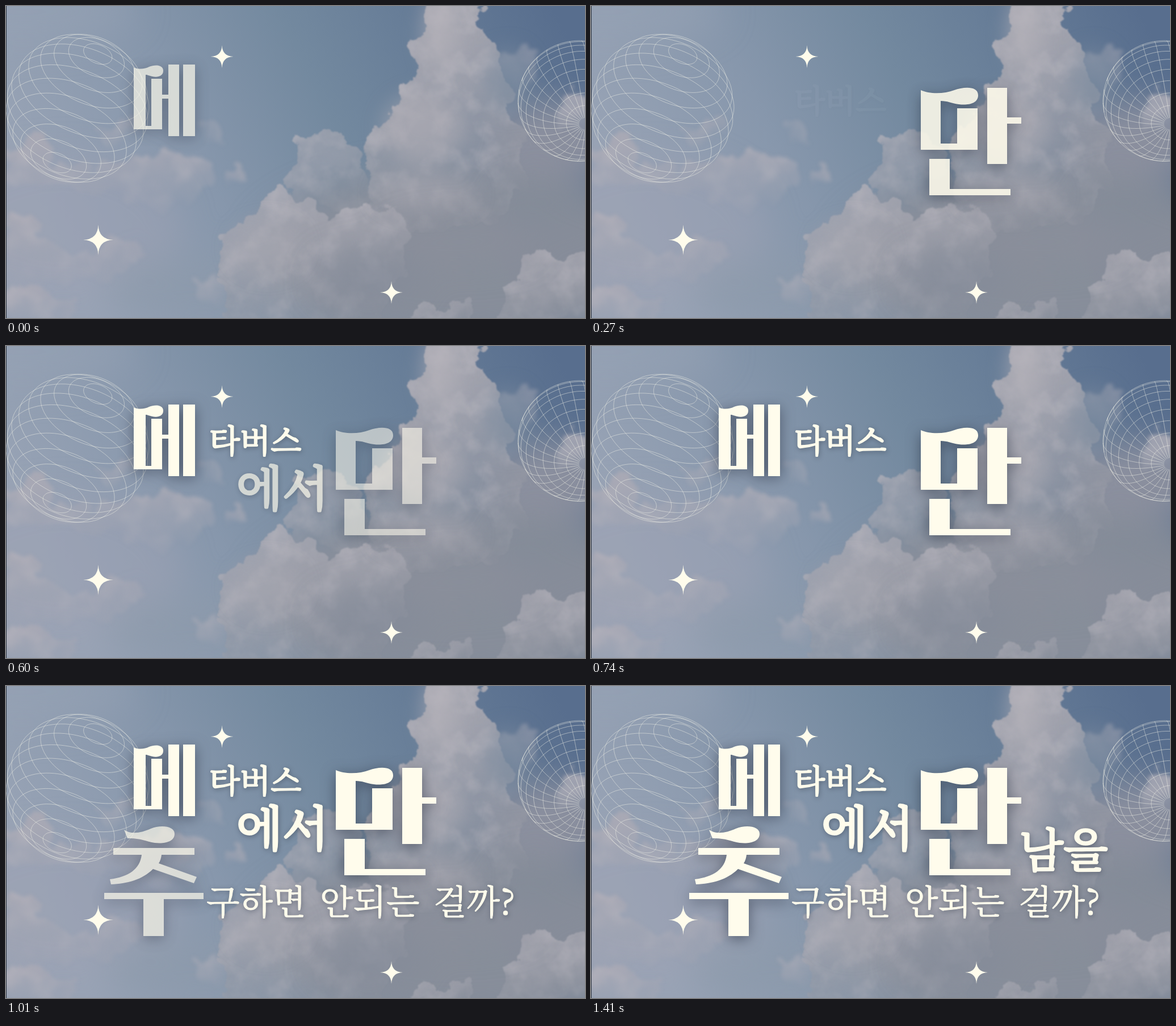
Animation of 1020x549 px, one loop 3270 ms. Source, as an HTML page:

```html
<!DOCTYPE html>
<html lang="ko">
<head>
<meta charset="utf-8">
<title>하늘 제목</title>
<style>
html, body { margin: 0; width: 100%; height: 100%; overflow: hidden; background: #8497b0; }
svg { display: block; width: 100vw; height: 100vh; }
.crisp { filter: url(#puff) blur(1px); }
.soft { filter: url(#puff) blur(3px); }
.haze { filter: blur(30px); }
.glow { filter: blur(18px); }
.wire { fill: none; stroke: #f3f2e8; stroke-width: .8; opacity: .62; }
.title, #stars { fill: #fffcec; }
.title path { filter: drop-shadow(0 5px 12px rgba(42, 50, 66, .6)); }
.title text {
  font-family: "Noto Serif CJK KR", "Noto Sans CJK KR", "Noto Sans CJK", serif;
  font-weight: 500;
  stroke: #fffcec;
  stroke-linejoin: round;
  filter: drop-shadow(1px 2px 4px rgba(42, 50, 66, .45));
}
</style>
</head>
<body>
<svg viewBox="0 0 1020 549" preserveAspectRatio="none">
  <defs>
    <linearGradient id="sky" gradientUnits="userSpaceOnUse" x1="90" y1="420" x2="960" y2="-10">
      <stop offset="0" stop-color="#98a3b5"/>
      <stop offset=".3" stop-color="#8797ac"/>
      <stop offset=".55" stop-color="#73899f"/>
      <stop offset="1" stop-color="#586e8e"/>
    </linearGradient>
    <linearGradient id="lit" x1="0" y1="0" x2=".25" y2="1">
      <stop offset="0" stop-color="#aaa9b2"/>
      <stop offset=".5" stop-color="#a2a3ad" stop-opacity=".9"/>
      <stop offset="1" stop-color="#8d929d" stop-opacity=".4"/>
    </linearGradient>
    <linearGradient id="dim" x1="0" y1="0" x2="0" y2="1">
      <stop offset="0" stop-color="#abaab5" stop-opacity=".95"/>
      <stop offset="1" stop-color="#9ea3b1" stop-opacity=".1"/>
    </linearGradient>
    <filter id="puff" x="-10%" y="-15%" width="120%" height="130%" color-interpolation-filters="sRGB">
      <feTurbulence type="fractalNoise" baseFrequency=".024" numOctaves="5" seed="7" result="noise"/>
      <feDisplacementMap in="SourceGraphic" in2="noise" scale="52" xChannelSelector="R" yChannelSelector="G" result="cloud"/>
      <feColorMatrix in="noise" values="0 0 0 0 .73  0 0 0 0 .72  0 0 0 0 .75  1.7 0 0 0 -.72"/>
      <feComposite in2="cloud" operator="in" result="light"/>
      <feMerge><feMergeNode in="cloud"/><feMergeNode in="light"/></feMerge>
    </filter>
  </defs>

  <rect width="1020" height="549" fill="url(#sky)"/>
  <g class="haze">
    <ellipse cx="30" cy="10" rx="200" ry="60" fill="#98a3b6" opacity=".5"/>
    <ellipse cx="100" cy="390" rx="210" ry="130" fill="#a0a4b3" opacity=".4"/>
    <ellipse cx="800" cy="440" rx="360" ry="150" fill="#8a8f9a" opacity=".95"/>
    <ellipse cx="960" cy="240" rx="120" ry="70" fill="#9697a2" opacity=".8"/>
    <ellipse cx="350" cy="500" rx="170" ry="60" fill="#8d99ab" opacity=".6"/>
  </g>
  <g class="soft" fill="url(#dim)">
    <path d="M0 258 30 235 60 232 85 250 80 278 150 290 200 268 240 260 290 255 340 258 368 285 360 315 330 342 280 355 200 335 100 322 0 310Z"/>
    <path d="M165 215 200 200 235 210 240 240 190 245Z" opacity=".6"/>
    <path d="M335 215 365 206 390 214 385 240 345 238Z" opacity=".45"/>
    <path d="M382 293 405 287 426 294 422 312 388 312Z" opacity=".8"/>
    <path d="M0 365 40 367 62 402 100 432 155 440 185 408 225 413 236 438 200 465 110 482 0 500Z"/>
    <path d="M0 498 40 488 72 512 110 518 130 565 0 565Z"/>
    <path d="M335 480 370 470 400 490 380 530 345 510Z" opacity=".5"/>
    <path d="M850 90 885 78 910 67 936 84 938 110 918 145 895 200 850 200Z" opacity=".5"/>
    <path d="M975 165 1000 152 1040 150 1040 230 980 215Z"/>
  </g>
  <g class="crisp" fill="url(#lit)">
    <path d="M742 -30 738 25 728 45 713 70 718 105 706 150 682 180 658 215 634 240 630 270 642 300 640 350 700 390 800 400 900 360 915 300 905 210 880 160 876 110 862 75 838 42 830 -30Z"/>
    <path d="M500 285 520 242 545 225 590 228 615 246 626 272 642 345 600 352 500 350Z" opacity=".65"/>
    <path d="M372 450 380 407 430 366 455 336 490 328 530 342 562 376 600 350 650 346 710 380 700 470 640 570 385 570 385 500Z" opacity=".8"/>
    <path d="M860 575 880 492 905 470 907 434 940 428 1060 440 1060 575Z" opacity=".75"/>
    <path d="M715 545 745 530 780 521 805 535 835 575 710 575Z" opacity=".6"/>
  </g>
  <g class="glow">
    <ellipse cx="765" cy="45" rx="28" ry="65" fill="#b6b3b9" opacity=".7"/>
    <ellipse cx="735" cy="215" rx="70" ry="60" fill="#b3b0b7" opacity=".55"/>
    <ellipse cx="740" cy="330" rx="85" ry="35" fill="#aeacb4" opacity=".45"/>
    <ellipse cx="460" cy="425" rx="60" ry="45" fill="#a9a9b2" opacity=".45"/>
    <ellipse cx="885" cy="130" rx="40" ry="55" fill="#7b8a9e" opacity=".6"/>
  </g>
  <g class="haze">
    <ellipse cx="640" cy="480" rx="90" ry="45" fill="#838b99" opacity=".7"/>
    <ellipse cx="945" cy="345" rx="80" ry="35" fill="#828a97" opacity=".7"/>
    <ellipse cx="800" cy="415" rx="130" ry="35" fill="#8d909b" opacity=".6"/>
  </g>
  <rect width="1" height="549" fill="#2c3440"/>

  <path id="left" class="wire"/>
  <path id="right" class="wire"/>
  <g id="stars"></g>

  <g class="title">
    <g id="me"><path d="M225 108C233 112 245 111 252 107C262 103 277 103 277 114C277 124 266 126 258 124C252 123 250 121 246 121V211H256V128H275V156H286V103H305V229H286V163H275V217H225ZM312 103H333V229H312Z"/></g>
    <g id="tabeoseu"><text x="358" y="187" font-size="56" stroke-width="2.4">타버스</text></g>
    <g id="eseo"><text x="406" y="281" font-size="84" stroke-width="4">에서</text></g>
    <g id="man"><path d="M581 148C596 155 622 155 640 148C656 142 682 140 682 157C682 172 664 175 648 173C634 171 628 167 616 167V242H645V180H681V253H581ZM698 144H733V196H758V207H733V278H698ZM596 269H632V322H739V333H596Z"/></g>
    <g id="nameul"><text x="754" y="318" font-size="81" stroke-width="3.4">남을</text></g>
    <g id="ju"><path d="M208 253C220 262 240 258 255 251C272 244 297 246 297 260C297 274 280 278 262 276C245 273 235 267 214 268ZM189 285H332V297H274Q273 306 269 312L336 336 331 347 259 322C240 341 213 348 185 349L183 340C216 336 236 322 239 297H189ZM173 364H348V375H278V440H242V375H173Z"/></g>
    <g id="ask"><text x="353" y="402" font-size="60.5" word-spacing="6" stroke-width="1">구하면 안되는 걸까?</text></g>
  </g>
</svg>
<script>
const $ = id => document.getElementById(id);
const { sin, cos, PI, hypot, min, max, floor } = Math;
const rad = deg => deg * PI / 180;

// Returns a projector from latitude and longitude around a tilted axis.
function sphere(cx, cy, rx, ry, [ax, ay, az]) {
  const h = hypot(ax, ay);
  return (lat, lon) => {
    const p = cos(lat) * cos(lon), q = cos(lat) * sin(lon), s = sin(lat);
    return [
      cx + rx * (p * ay / h + q * az * ax / h + s * ax),
      cy + ry * (-p * ax / h + q * az * ay / h + s * ay),
      s * az - q * h
    ];
  };
}

function trace(points, frontOnly) {
  let d = '', pen = 'M';
  for (const [x, y, z] of points) {
    if (frontOnly && z < 0) { pen = 'M'; continue; }
    d += `${pen}${x.toFixed(1)} ${y.toFixed(1)}`;
    pen = 'L';
  }
  return d;
}

const steps = Array.from({ length: 91 }, (_, i) => i / 90);
const parallel = (ball, lat) => steps.map(k => ball(rad(lat), k * 2 * PI));
const meridian = (ball, lon) => steps.map(k => ball(rad(84 - 150 * k), rad(lon)));

const ball = sphere(126, 180, 126, 131, [.29, -.745, .6]);
let rings = '';
for (let lat = -78; lat <= 78; lat += 12) rings += trace(parallel(ball, lat));
$('left').setAttribute('d', rings);

const dome = sphere(1010, 167, 108, 106, [.1, .38, .92]);
let grid = 'M1118 167A108 106 0 1 0 902 167A108 106 0 1 0 1118 167';
for (let lat = -48; lat < 80; lat += 12) grid += trace(parallel(dome, lat), true);
for (let lon = 0; lon < 360; lon += 12) grid += trace(meridian(dome, lon), true);
$('right').setAttribute('d', grid);

const star = (x, y, r) =>
  `<path transform="translate(${x} ${y}) scale(${r})" d="M0-1Q.03-.03 1 0Q.03.03 0 1Q-.03.03-1 0Q-.03-.03 0-1"/>`;
$('stars').innerHTML = star(380.5, 89, 20) + star(162.5, 411.5, 26.5) + star(679, 504, 20);

// Tick at which each part starts to fade in for good; some flash once beforehand.
const FADE = 3, LEAD = 6, LOOP = 3270, TICK = 1000 / 15, LAST = 21;
const parts = { me: 4, tabeoseu: 3.9, man: 7.4, eseo: 11.3, ju: 13, nameul: 16.5, ask: 18 };
const flashing = new Set(['me', 'man', 'eseo', 'ask']);

const clamp = v => max(0, min(1, v));
const flash = u => clamp(min(u / FADE, (LEAD - 1 - u) / 2));

const start = performance.now();
function draw() {
  const t = (performance.now() - start) % LOOP;
  const n = min(LAST, floor((t + 4) / TICK));
  for (const [id, from] of Object.entries(parts)) {
    const first = flashing.has(id) ? flash(n - from + LEAD) : 0;
    $(id).style.opacity = max(first, clamp((n - from) / FADE));
  }
  requestAnimationFrame(draw);
}
draw();
</script>
</body>
</html>
```
